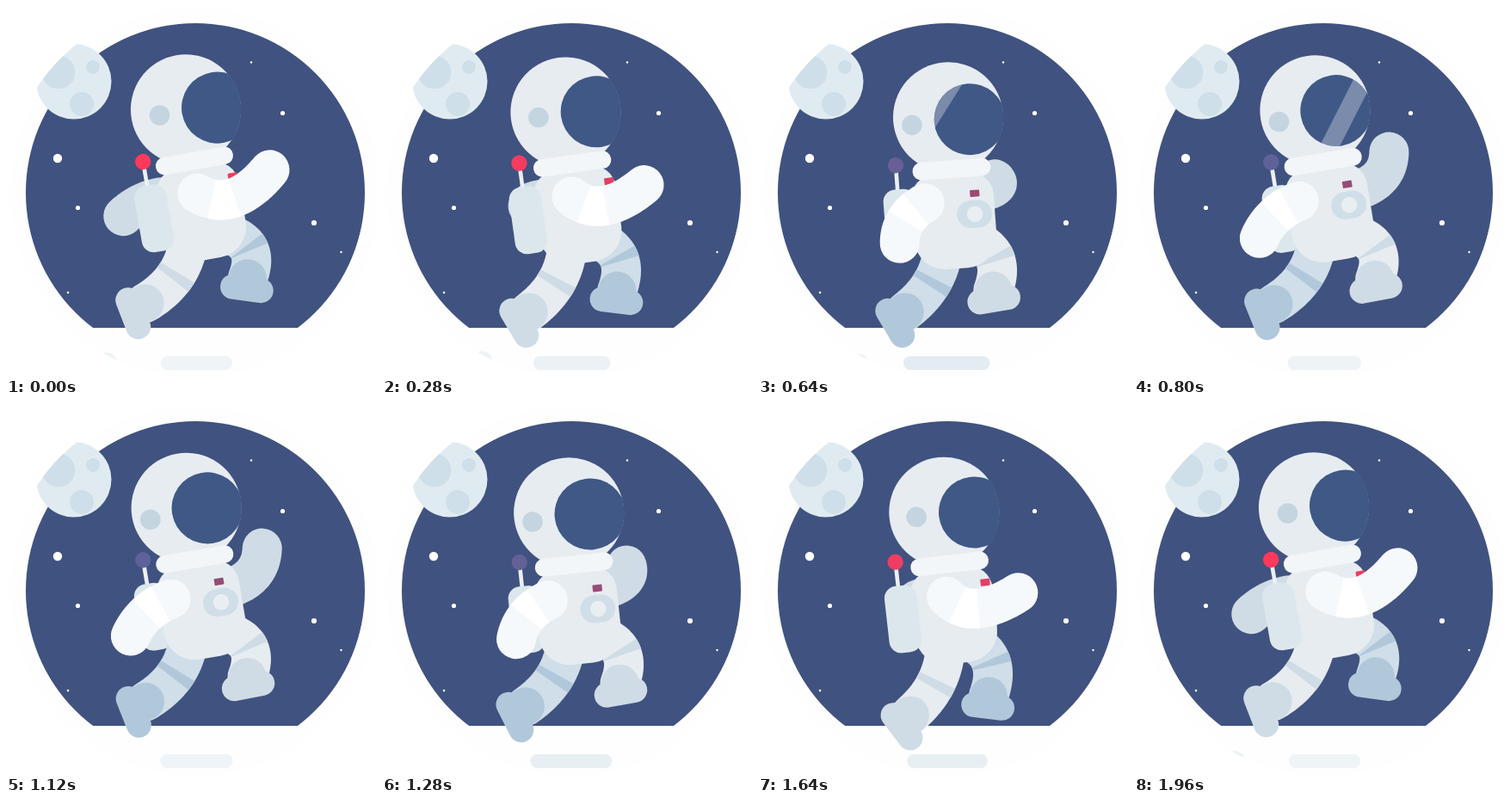
An HTML page with a canvas that plays this animation: 430x430 px, repeating every 2 s.

```html
<!DOCTYPE html>
<html lang="en">
<head>
<meta charset="utf-8">
<title>Running astronaut</title>
<style>
html, body { margin: 0; width: 100%; height: 100%; overflow: hidden; background: #fff; }
canvas { display: block; width: 430px; height: 430px; }
</style>
</head>
<body>
<canvas id="stage" width="430" height="430"></canvas>
<script>
const ctx = document.getElementById('stage').getContext('2d');
const LOOP = 2000, STEP = 40, TAU = Math.PI * 2;
const SUIT = '#e7ecf1', GREY = '#cfdce5', BLUE = '#b1c8db';

// Every joint travels along a Bezier path while the stride goes from 0 to 1.
const legPath = {
  hip: [[211, 278], [238, 329], [255, 264]],
  knee: [[204, 320], [240, 373], [297, 275]],
  heel: [[161.5, 345], [227, 425], [281, 316]]
};
const frontArmPath = {
  shoulder: [[222.5, 217.5], [208, 247], [191.5, 226.5]],
  elbow: [[264, 242], [196, 299], [159, 238]],
  hand: [[306.5, 190], [298, 324], [143.5, 269]]
};
const backArmPath = {
  shoulder: [[200, 222], [228, 240], [258, 214]],
  elbow: [[165, 218], [220, 260], [297, 203]],
  hand: [[135.5, 244.5], [318, 170], [166, 362], [299.5, 165]]
};

const mix = (a, b, k) => a.map((v, i) => v + (b[i] - v) * k);
const color = (a, b, k) => `rgb(${mix(a, b, k).map(Math.round)})`;
const sigmoid = x => 1 / (1 + Math.exp(-x));
const bump = x => Math.exp(-x * x / 2);

function bezier(points, k) {
  while (points.length > 1) points = points.slice(1).map((p, i) => mix(points[i], p, k));
  return points[0];
}
const joints = (path, stride) => Object.values(path).map(points => bezier(points, stride));

function ellipse(x, y, rx, fill, ry = rx) {
  ctx.fillStyle = fill;
  ctx.beginPath();
  ctx.ellipse(x, y, rx, ry, 0, 0, TAU);
  ctx.fill();
}
function box(x, y, w, h, r, fill) {
  ctx.fillStyle = fill;
  ctx.beginPath();
  ctx.roundRect(x, y, w, h, r);
  ctx.fill();
}
function clipped(x, y, r, paint) {
  ctx.save();
  ctx.beginPath();
  ctx.arc(x, y, r, 0, TAU);
  ctx.clip();
  paint();
  ctx.restore();
}
function moved(x, y, degrees, paint) {
  ctx.save();
  ctx.translate(x, y);
  ctx.rotate(degrees * Math.PI / 180);
  paint();
  ctx.restore();
}

// Thick limb along the joints, or a band across it
function limb(points, stroke, from = 0, to = 1) {
  ctx.beginPath();
  for (let i = 0; i <= 24; i++) ctx.lineTo(...bezier(points, from + (to - from) * i / 24));
  ctx.lineWidth = 46;
  ctx.strokeStyle = stroke;
  ctx.lineJoin = 'round';
  ctx.lineCap = to - from < 1 ? 'butt' : 'round';
  ctx.stroke();
}
function leg(stride, toeAngle, fill, accent) {
  const points = joints(legPath, stride), heel = points[2];
  const [angle] = bezier([[69], [-2], [toeAngle]], stride);
  limb(points, fill);
  limb(points, accent, 0.41, 0.53);
  ellipse(...heel, 22, accent);
  moved(...heel, angle, () => box(-31 + 0.09 * angle, -3 + 0.085 * angle, 62, 29, 14.5, accent));
}

function scenery(t, lean) {
  ctx.fillStyle = '#fff';
  ctx.fillRect(0, 0, 430, 430);
  ellipse(220, 217, 215, '#fefefe');
  clipped(220, 217, 197, () => {
    ctx.fillStyle = '#40527f';
    ctx.fillRect(0, 0, 430, 374);
  });
  const craterY = 416 - 5 * Math.cos((t - 260) / LOOP * TAU);
  clipped(220, 217, 215, () => ellipse(117, craterY, 11, '#edf3f5', 10));
  clipped(220, 217, 221, () => clipped(78.8, 87.8, 43.7, () => {
    ellipse(79, 88, 45, '#e0ebf1');
    for (const [x, y, r] of [[61, 77, 19.5], [101, 71, 8], [88, 114, 14]]) ellipse(x, y, r, '#cfdfe9');
  }));
  for (const [x, y, r] of [[60, 177, 5.2], [83.5, 234.5, 2.6], [72, 333, 1.3], [285, 65.5, 1.2],
    [321.5, 124.5, 2.6], [358, 252, 3.1], [389.5, 286, 1.2]]) ellipse(x, y, r, '#fff');
  const half = 56.5 - 15 * lean;
  box(217.5 + 4 * lean - half, 407, 2 * half, 16, 7.5, color([218, 230, 236], [239, 244, 247], lean));
}

// The body parts below are drawn upright, relative to the middle of the torso.
function pack(lean, stride) {
  moved(9.5 * lean, 0, 0, () => {
    box(-69.3, -66, 4.6, 26, 0, '#ebf0f4');
    box(-84.5, -42, 37.5, 78, 14, '#dce7ed');
    ellipse(-67, -70, 9.2, color([255, 57, 91], [94, 98, 153], stride));
  });
}
function torso(turn, stride) {
  box(-48, -56, 96, 111, [28, 28, 36, 36], SUIT);
  moved(turn * 1.4, turn * -0.4, 0, () => {
    box(8, -24, 41, 32, 16, '#d0dee7');
    ellipse(29, -8, 9.3, '#e9eef3');
    box(25, -36, 11, 8, 1, color([235, 62, 95], [150, 75, 118], stride));
  });
}
function head(turn, t) {
  ellipse(2, -121.2, 64, SUIT);
  ellipse(-37.5 + turn, -116.5 - turn * 0.4, 11.8, '#c4d5e0');
  const x = 30 + turn, y = -117, shine = x + (t - 800) * 0.4;
  clipped(2, -121.2, 64.3, () => clipped(x, y, 41.5, () => {
    ellipse(x, y, 42, '#405886');
    ctx.fillStyle = 'rgba(255,255,255,.3)';
    ctx.beginPath();
    for (const [dx, dy] of [[35, -45], [61, -45], [-5, 45], [-31, 45]]) ctx.lineTo(shine + dx, y + dy);
    ctx.fill();
  }));
  box(-44, -71, 91, 20.5, 10, '#f3f6f9');
}

function draw(t) {
  // Two quick strides per loop; the body dips and straightens in each.
  const stride = sigmoid((t - 460) / 70) - sigmoid((t - 1500) / 70);
  const lean = 1 - bump((t - 505) / 128) - bump((t - 1455) / 128);
  const turn = 8.4 - 12.4 * stride;
  const inBody = paint => moved(228, 258 - 18 * lean, -10 * lean, paint);
  const drawPack = () => inBody(() => pack(lean, stride));
  const frontArm = joints(frontArmPath, stride);

  scenery(t, lean);
  limb(joints(backArmPath, stride), GREY);
  if (stride > 0.5) drawPack();
  leg(1 - stride, 8, '#cfdee8', BLUE);
  leg(stride, -11, SUIT, GREY);
  inBody(() => torso(turn, stride));
  if (stride <= 0.5) drawPack();
  inBody(() => head(turn, t));
  limb(frontArm, '#f5f9fb');
  limb(frontArm, '#fff', 0.2, 0.52);
}

function tick() {
  draw(Math.floor(performance.now() % LOOP / STEP) * STEP);
  requestAnimationFrame(tick);
}
tick();
</script>
</body>
</html>
```
